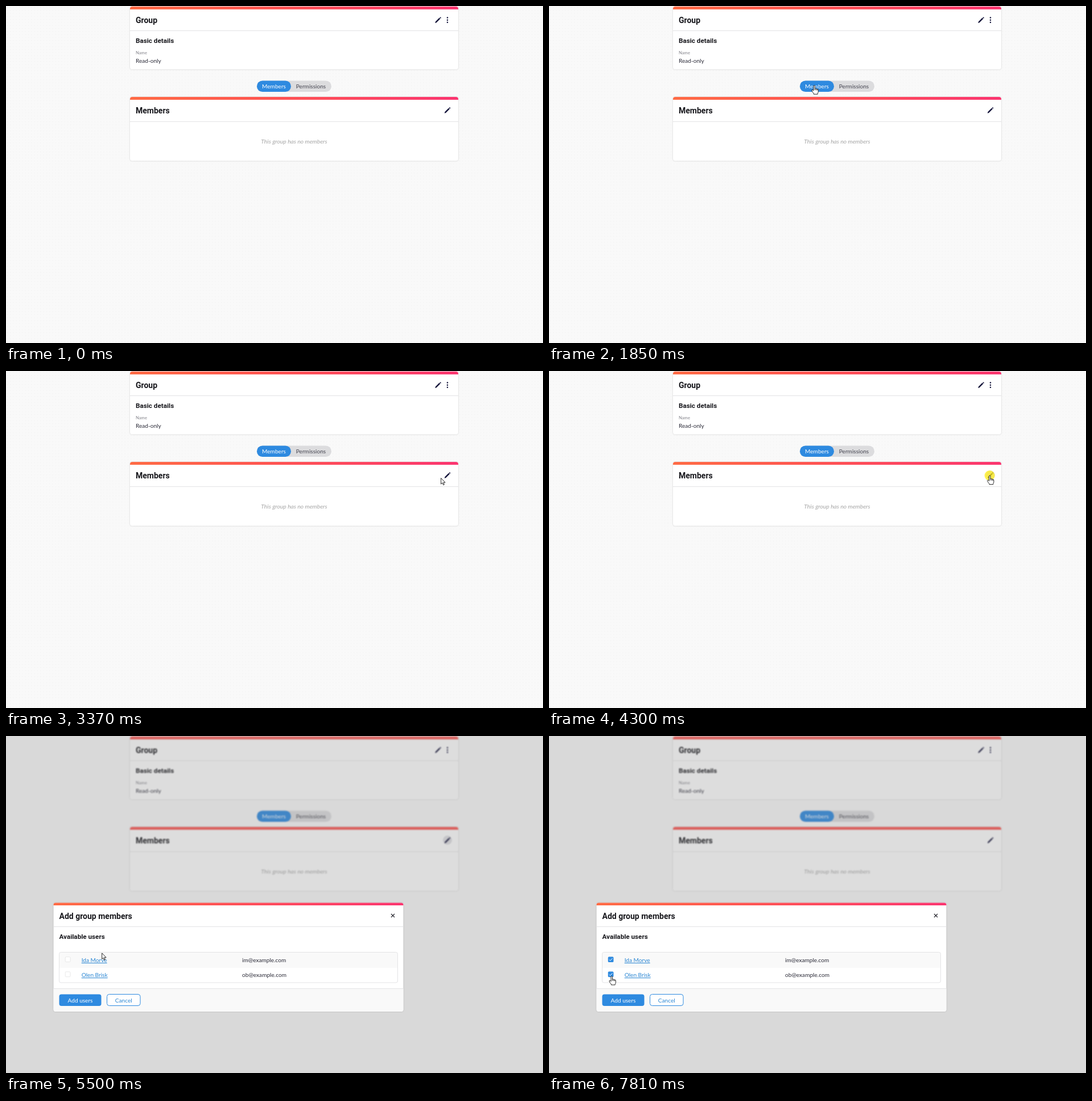
Animation of 944 by 593 pixels, one loop 8 s. Source, as an HTML page:

```html
<!DOCTYPE html>
<html lang="en">
<head>
<meta charset="utf-8">
<title>Add group members</title>
<style>
  html, body { margin: 0; width: 100%; height: 100%; overflow: hidden; background: #f9f9f9; }
  svg { display: block; width: 944px; height: 593px; }
  text { font: 10.1px Lato, sans-serif; fill: #2b2b38; }
  .title { font: 700 14px Roboto, sans-serif; fill: #17171c; }
  .subtitle { font: 700 11.7px Roboto, sans-serif; fill: #17171c; }
  .label { font-size: 7.7px; fill: #85858c; }
  .empty { font-style: italic; font-size: 10.3px; fill: #a6a6a6; }
  .mid { text-anchor: middle; }
  .on-blue { fill: #fff; }
  .link { fill: #2a86d3; text-decoration: underline; }
  .blue { fill: #2e8ae0; }
  .panel { fill: #fff; filter: drop-shadow(0 .5px 1px #0003); }
  .bar { fill: url(#warm); }
  .line { stroke: #e3e3e5; fill: none; }
  .box { fill: #fff; stroke: #e2e2e2; stroke-width: .8; }
  .tick { fill: none; stroke: #fff; stroke-width: 1; }
  .ink { fill: #14143a; }
  .cursor { fill: #fff; stroke: #111; stroke-width: .9; stroke-linejoin: round; }
  .dimmed { filter: blur(.9px); }
  .dimmed .bar { fill: #fb5b57; }
  .off { display: none; }
</style>
</head>
<body>
<svg viewBox="0 0 944 593">
  <defs>
    <linearGradient id="warm">
      <stop stop-color="#ff6b45"/>
      <stop offset=".4" stop-color="#ff5650"/>
      <stop offset="1" stop-color="#fb3570"/>
    </linearGradient>
    <pattern id="dots" width="5.3" height="5.3" patternUnits="userSpaceOnUse">
      <rect x="2" y="2" width="1" height="1" fill="#ededed"/>
    </pattern>
    <path id="pencil" class="ink" d="M-5.2 5.2 -4.5 2.8 2.2 -3.9 3.9 -2.2 -2.8 4.5ZM2.8 -4.5 3.6 -5.2Q4.1 -5.5 4.6 -5L5 -4.6Q5.5 -4.1 5.2 -3.6L4.5 -2.8Z"/>
    <g id="checked">
      <rect class="blue" x="-4.8" y="-4.8" width="9.6" height="9.6" rx="1.6"/>
      <path class="tick" d="M-2.8 .3 -.9 2.1 2.9 -2"/>
    </g>
  </defs>

  <rect width="944" height="593" fill="#f9f9f9"/>
  <rect id="texture" width="944" height="593" fill="url(#dots)"/>

  <g id="page">
    <rect class="panel" x="218" y="1" width="577" height="110.5" rx="4"/>
    <path class="bar" d="M218 6V5Q218 1 222 1H791Q795 1 795 5V6Z"/>
    <path class="line" d="M218 43.5H795"/>
    <text class="title" x="228" y="30.3">Group</text>
    <use href="#pencil" x="759.5" y="24.7"/>
    <g class="ink">
      <circle cx="776" cy="20.6" r="1.25"/>
      <circle cx="776" cy="24.7" r="1.25"/>
      <circle cx="776" cy="28.8" r="1.25"/>
    </g>
    <text class="subtitle" x="228" y="65.3">Basic details</text>
    <text class="label" x="228" y="85.2">Name</text>
    <text x="228" y="100">Read-only</text>

    <rect x="441" y="131.5" width="131" height="19.5" rx="9.75" fill="#dcdcde"/>
    <rect class="blue" x="441" y="131.5" width="60" height="19.5" rx="9.75"/>
    <text class="mid on-blue" x="471" y="145.2">Members</text>
    <text class="mid" x="536" y="145.2" fill-opacity=".85">Permissions</text>

    <rect class="panel" x="218" y="160" width="577" height="112.5" rx="4"/>
    <path class="bar" d="M218 165V164Q218 160 222 160H791Q795 160 795 164V165Z"/>
    <path class="line" d="M218 203.5H795"/>
    <text class="title" x="228" y="189">Members</text>
    <circle id="hover" cx="776" cy="183.3" r="8" fill="#dedee2"/>
    <use href="#pencil" x="776" y="183.5"/>
    <text class="mid empty" x="506.5" y="242.2">This group has no members</text>
  </g>

  <g id="modal">
    <rect width="944" height="593" fill="#787878" fill-opacity=".25"/>
    <rect class="panel" x="83.5" y="293.5" width="615" height="191.5" rx="4"/>
    <path d="M83.5 444.5H698.5V481Q698.5 485 694.5 485H87.5Q83.5 485 83.5 481Z" fill="#f9f9f9"/>
    <path class="bar" d="M83.5 298V297.500Q83.5 293.5 87.5 293.5H694.5Q698.5 293.5 698.5 297.500V298Z"/>
    <path class="line" d="M83.5 335.5H698.5M83.5 444.5H698.5"/>
    <text class="title" x="93.5" y="322.3">Add group members</text>
    <path d="M677 313 683 319M683 313 677 319" stroke="#26262e" stroke-width="1.2"/>
    <text class="subtitle" x="93.5" y="357.2">Available users</text>

    <rect x="94" y="381" width="594" height="27" fill="#f9f9f9"/>
    <rect class="line" x="93.5" y="380.5" width="595" height="53.5" rx="3"/>
    <rect class="box" x="104.200" y="388.700" width="8.800" height="8.800" rx="1.500"/>
    <rect class="box" x="104.200" y="414.900" width="8.800" height="8.800" rx="1.500"/>
    <use id="check1" href="#checked" x="108.6" y="393.200"/>
    <use id="check2" href="#checked" x="108.6" y="419.400"/>
    <text class="link" x="132.700" y="398">Ida Morve</text>
    <text x="415" y="398">im@example.com</text>
    <text class="link" x="132.700" y="424.200">Olen Brisk</text>
    <text x="415" y="424.200">ob@example.com</text>

    <rect class="blue" x="93.500" y="454.500" width="74" height="20.500" rx="4"/>
    <text class="mid on-blue" x="130.500" y="468.700">Add users</text>
    <rect x="177.500" y="454.500" width="58.500" height="20" rx="4" fill="#fff" stroke="#2e8ae0"/>
    <text class="mid link" x="206.700" y="468.700" style="text-decoration:none">Cancel</text>
  </g>

  <g id="pointer">
    <circle id="press" r="9" fill="#ffee1a" fill-opacity=".75"/>
    <path id="arrow" class="cursor" d="M.4 .4V11L2.800 8.800 4.500 12.600 6.200 11.900 4.500 8.200H7.800Z"/>
    <g id="hand" class="cursor">
      <path d="M-1 9.500V1.300Q-1 .2 .2 .2T1.400 1.300V5.600Q3 5 3.600 6.200Q5 5.600 5.600 6.800Q7.300 6.400 7.300 8.400V11Q7.300 13 6.200 14.300V15.700H-.6V14.500Q-2.600 12.400 -3.900 9.600Q-4.400 8 -3.200 7.800Q-2.200 8 -1 9.500Z"/>
      <path d="M1.400 5.600V8.500M3.600 6.200V8.800M5.600 6.800V9" fill="none"/>
    </g>
  </g>
</svg>
<script>
  const LOOP = 8000, OPEN = 4430;
  const el = id => document.getElementById(id);
  const show = (id, on) => el(id).classList.toggle('off', !on);
  const within = (t, from, to) => t >= from && t < to;

  const glide = k => k * k * (3 - 2 * k);
  const settle = power => k => 1 - (1 - k) ** power;

  // Each move goes in even steps to a point, optionally bent by a control point.
  const moves = [
    { from: 450, to: 1250, steps: 13, end: [458, 172], ease: glide },
    { from: 1320, to: 1850, steps: 8, end: [466, 139.5], ease: settle(1.5) },
    { from: 2840, to: 3370, steps: 9, end: [764.3, 188], bend: [640, 218], ease: glide },
    { from: 3510, to: 4040, steps: 7, end: [774.6, 184], ease: settle(1.5) },
    { from: 4830, to: 5630, steps: 13, end: [127, 395], ease: glide },
    { from: 5700, to: 6020, steps: 6, end: [110, 395.5], ease: settle(1.5) },
    { from: 6680, to: 7140, steps: 8, end: [110, 422.3], ease: settle(4.2) }
  ];
  const presses = [[2180, 2250], [4300, 4430], [6420, 6490], [7670, 7810]];

  // Clickable areas: left, top, right, bottom.
  const pencilZone = [768, 175, 784, 191];
  const pageZones = [[441, 131, 572, 151], pencilZone];
  const modalZones = [[103, 388, 115, 399], [103, 414, 115, 425], [133, 388, 177, 400]];
  const hits = ([x, y]) => ([l, t, r, b]) => x >= l && x <= r && y >= t && y <= b;

  function pointerAt(t) {
    let pos = [917, 592];
    for (const { from, to, steps, end, bend, ease } of moves) {
      if (t < from) break;
      const step = Math.floor((t - from) / (to - from) * (steps - 1) + 1e-6) + 1;
      const k = ease(Math.min(1, step / steps));
      pos = pos.map((a, i) => {
        const c = bend ? bend[i] : (a + end[i]) / 2;
        return a * (1 - k) ** 2 + 2 * c * k * (1 - k) + end[i] * k * k;
      });
    }
    return pos;
  }

  function draw(t) {
    const open = t >= OPEN;
    const pos = pointerAt(t);
    const hit = hits(pos);
    const hand = (open ? modalZones : pageZones).some(hit);

    show('texture', !open);
    show('modal', open);
    el('page').classList.toggle('dimmed', open);
    show('hover', open ? t < 6420 : hit(pencilZone));
    show('check1', t >= 6490);
    show('check2', t >= 7810);

    show('pointer', t >= 450);
    el('pointer').setAttribute('transform', `translate(${pos})`);
    show('press', presses.some(([a, b]) => within(t, a, b)));
    show('hand', hand);
    show('arrow', !hand);
  }

  const start = performance.now();
  function tick() {
    draw((performance.now() - start) % LOOP);
    requestAnimationFrame(tick);
  }
  tick();
</script>
</body>
</html>
```
